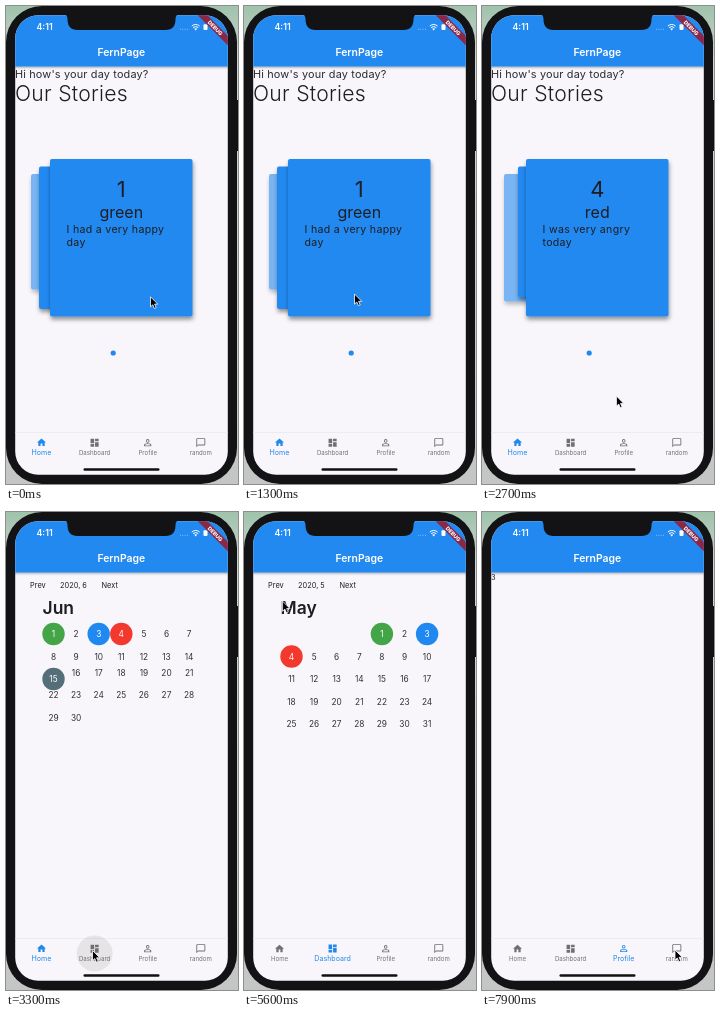
Animation of 232 by 478 pixels, one loop 8000 ms. Source, as an HTML page:

```html
<!DOCTYPE html>
<html lang="en">
<head>
<meta charset="utf-8">
<style>
html, body { margin: 0; width: 232px; height: 478px; overflow: hidden; background: #b9c4be; }
svg { display: block; font-family: Inter, "Liberation Sans", sans-serif; }
</style>
</head>
<body>
<svg width="232" height="478" viewBox="0 0 232 478">
  <defs>
    <clipPath id="screen"><rect x="9.2" y="9.2" width="212.6" height="459.6" rx="23"/></clipPath>
    <filter id="cardShadow" x="-20%" y="-20%" width="140%" height="140%">
      <feDropShadow dx=".6" dy="3" stdDeviation="2" flood-opacity=".42"/>
    </filter>
    <filter id="barShadow" x="-5%" y="-20%" width="110%" height="150%">
      <feDropShadow dx="0" dy="1" stdDeviation="1" flood-opacity=".35"/>
    </filter>
    <linearGradient id="desk" x2="0" y2="1">
      <stop stop-color="#9fc3ab"/><stop offset=".12" stop-color="#d2d4d3"/><stop offset="1" stop-color="#c3c6c5"/>
    </linearGradient>
  </defs>
  <rect width="232" height="478" fill="url(#desk)"/>
  <rect x="229" y="94" width="3" height="51" fill="#111"/>
  <rect width="231" height="478" rx="36" fill="#131214"/>
  <g clip-path="url(#screen)">
    <rect x="9" y="9" width="213" height="460" fill="#f8f6fa"/>
    <g id="page"></g>
    <path d="M9 426.500H222" stroke="#ebe9ed" stroke-width=".8"/>
    <g id="nav"></g>
    <rect x="77.500" y="462.300" width="76" height="2.400" rx="1.200" fill="#111"/>
    <rect x="5" y="5" width="221" height="55.500" fill="#2089f1" filter="url(#barShadow)"/>
    <text x="115.300" y="50" font-size="10.400" font-weight="600" fill="#fff" text-anchor="middle">FernPage</text>
    <g fill="#fff">
      <text x="30.500" y="24.200" font-size="8.800" font-weight="600">4:11</text>
      <path d="M174 23.300h8" stroke="#fff" stroke-opacity=".45" stroke-dasharray="1 1.300"/>
      <path d="M189.700 24.400l-1.500-1.600q1.500-1.200 3 0z"/>
      <path d="M187.100 21.600q2.600-2.100 5.200 0M185.800 20q3.900-3.100 7.800 0" fill="none" stroke="#fff"/>
      <rect x="197.500" y="18.300" width="4" height="5.600" rx="1"/>
    </g>
    <g transform="translate(209.200 21.900) rotate(45)">
      <rect x="-30" y="-3.400" width="60" height="6.800" fill="#8b2847"/>
      <text y="2" font-size="5.400" font-weight="800" fill="#fff" text-anchor="middle">DEBUG</text>
    </g>
  </g>
  <path d="M58 8q3.500 1 3.500 5q0 11 10 11H159.500q10 0 10-11q0-4 3.500-5z" fill="#131214"/>
  <path id="cursor" d="M0 .5V10.600l2.300-2.100 1.600 3.700 1.800-.8-1.600-3.600h3.200z" stroke="#fff" stroke-width=".8"/>
</svg>
<script>
const LOOP = 8000, STEP = 100;
const TAP_DASH = 3300, TAP_PREV = 5000, TAP_PROFILE = 6900;
const BLUE = '#2089f1', GREEN = '#43a547', RED = '#f3382d', SLATE = '#546e7a';
const INK = '#1e1e22', MID = 'text-anchor="middle"';

const el = id => document.getElementById(id);
const clamp = v => Math.min(1, Math.max(0, v));
// Eased progress from 0 to 1 between two times
const ease = (t, from, to) => {
  const k = clamp((t - from) / (to - from));
  return k * k * (3 - 2 * k);
};
const text = (s, x, y, size, fill = INK, extra = '') =>
  `<text x="${x}" y="${y}" font-size="${size}" fill="${fill}" ${extra}>${s}</text>`;

// Back to front; trim makes a card shorter
const stories = [
  { num: 2, mood: 'blue', lines: ['I was a bit sad', 'today'], trim: 0 },
  { num: 3, mood: 'blue', lines: ['I was a bit sad', 'today'], trim: 12 },
  { num: 4, mood: 'red', lines: ['I was very angry', 'today'], trim: 0 },
  { num: 1, mood: 'green', lines: ['I had a very happy', 'day'], trim: 0 }
];

function card({ num, mood, lines, trim }, depth) {
  const back = Math.max(0, depth), passed = Math.max(0, -depth);
  const x = 44 - 11 * back + 196 * passed + trim / 4, y = 153 + 7.5 * back;
  const h = 157.5 - 15 * back - trim, w = h * .905;
  const cx = x + w / 2, cy = y + h / 2;
  return `<g opacity="${clamp(2.05 - .73 * back)}">` +
    `<rect x="${x}" y="${y}" width="${w}" height="${h}" rx="2" fill="${BLUE}" filter="url(#cardShadow)"/>` +
    text(num, cx, cy - 41, 22, INK, MID) + text(mood, cx, cy - 20, 16, INK, MID) +
    lines.map((s, i) => text(s, x + 16.5, cy - 4.8 + 13.2 * i, 10.6, INK, 'letter-spacing=".3"')).join('') + '</g>';
}

function home(t) {
  const swipe = ease(t, 1400, 2500);
  return text("Hi how's your day today?", 9, 71.9, 10.9, '#2c2c30', 'letter-spacing=".16"') +
    text('Our Stories', 9, 94.9, 21.2, INK, 'font-weight="300" letter-spacing=".25"') +
    stories.map((s, i) => card(s, 3 - i - swipe)).join('') +
    `<circle cx="107.2" cy="347" r="2.6" fill="${BLUE}"/>`;
}

// A marked day 15 keeps its line while the rest of its row and those below move up by lift
function month(name, num, days, offset, marks, lift = 0) {
  const bar = [['Prev', 24], [`2020, ${num}`, 54], ['Next', 95.5]];
  let out = bar.map(([s, x]) => text(s, x, 75.5, 7.4)).join('') +
    text(name, 36.5, 102, 17.5, INK, 'font-weight="600"');
  for (let d = 1; d <= days; d++) {
    const cell = d - 1 + offset, row = Math.floor(cell / 7);
    const x = 47.5 + cell % 7 * 22.6;
    const y = 122 + 22.5 * row - (row > 1 && !marks[d] ? lift : 0);
    if (marks[d]) out += `<circle cx="${x}" cy="${y}" r="11.2" fill="${marks[d]}"/>`;
    out += text(d, x, y + 3, 8.3, marks[d] ? '#fff' : '#303034', MID);
  }
  return out;
}

const june = month('Jun', 6, 30, 0, { 1: GREEN, 3: BLUE, 4: RED, 15: SLATE }, 6.3);
const may = month('May', 5, 31, 4, { 1: GREEN, 3: BLUE, 4: RED });

function page(t) {
  if (t < TAP_DASH) return home(t);
  if (t < TAP_PREV) return june;
  if (t < TAP_PROFILE) return may;
  return text('3', 9, 67.6, 7.4);
}

const tabs = [
  ['Home', 'M10 20v-6h4v6h5v-8h3L12 3 2 12h3v8z'],
  ['Dashboard', 'M3 13h8V3H3zM3 21h8v-6H3zM13 21h8V11h-8zM13 3v6h8V3z'],
  ['Profile', 'M12 4a4 4 0 1 0 0 8 4 4 0 0 0 0-8m0 2a2 2 0 1 1 0 4 2 2 0 0 1 0-4M12 13q-8 .5-8 4v3h16v-3q0-3.500-8-4m0 2q5.500.3 6 2.500v.6H6v-.6q.5-2.200 6-2.500'],
  ['random', 'M20 2H4q-2 0-2 2v18l4-4h14q2 0 2-2V4q0-2-2-2m0 14H6l-2 2V4h16z']
];
const taps = [-LOOP, TAP_DASH, TAP_PROFILE, LOOP, LOOP];

function nav(t) {
  return tabs.map(([label, icon], i) => {
    const x = 35.5 + i * 53.1, age = t - taps[i];
    const next = i === 3 ? LOOP : taps[i + 1];
    const k = ease(t, taps[i], taps[i] + 300) - ease(t, next, next + 300);
    const mix = (a, b) => Math.round(a + (b - a) * k);
    const color = `rgb(${mix(112, 32)},${mix(112, 137)},${mix(114, 235)})`;
    const ripple = age >= 0 && age < 400
      ? `<circle cx="${x}" cy="441.5" r="${18 + age / 60}" opacity="${.075 * (1 - age / 400)}"/>` : '';
    return ripple +
      `<path transform="translate(${x - 5.4} ${431.3 - k * .2}) scale(.45)" d="${icon}" fill="${color}" fill-rule="evenodd"/>` +
      text(label, x, 448.8, 6.1 + k, color, MID);
  }).join('');
}

// Each move: start, end, and where the pointer arrives
const moves = [
  [100, 1200, 110.5, 287.5], [1400, 1800, 238, 285], [2200, 3000, 86.5, 438],
  [3700, 4500, 35, 73], [5500, 6300, 118, 437.5], [6550, 6850, 139, 438], [7200, 7700, 193, 437.5]
];

function pointer(t) {
  return moves.reduce(([x, y], [from, to, nx, ny]) => {
    const k = ease(t, from, to);
    return [x + (nx - x) * k, y + (ny - y) * k];
  }, [144.5, 290.3]);
}

let shown = -1;
function draw(now) {
  const t = Math.floor(now % LOOP / STEP) * STEP;
  if (t !== shown) {
    shown = t;
    el('page').innerHTML = page(t);
    el('nav').innerHTML = nav(t);
    el('cursor').setAttribute('transform', `translate(${pointer(t)})`);
  }
  requestAnimationFrame(draw);
}
draw(performance.now());
</script>
</body>
</html>
```
